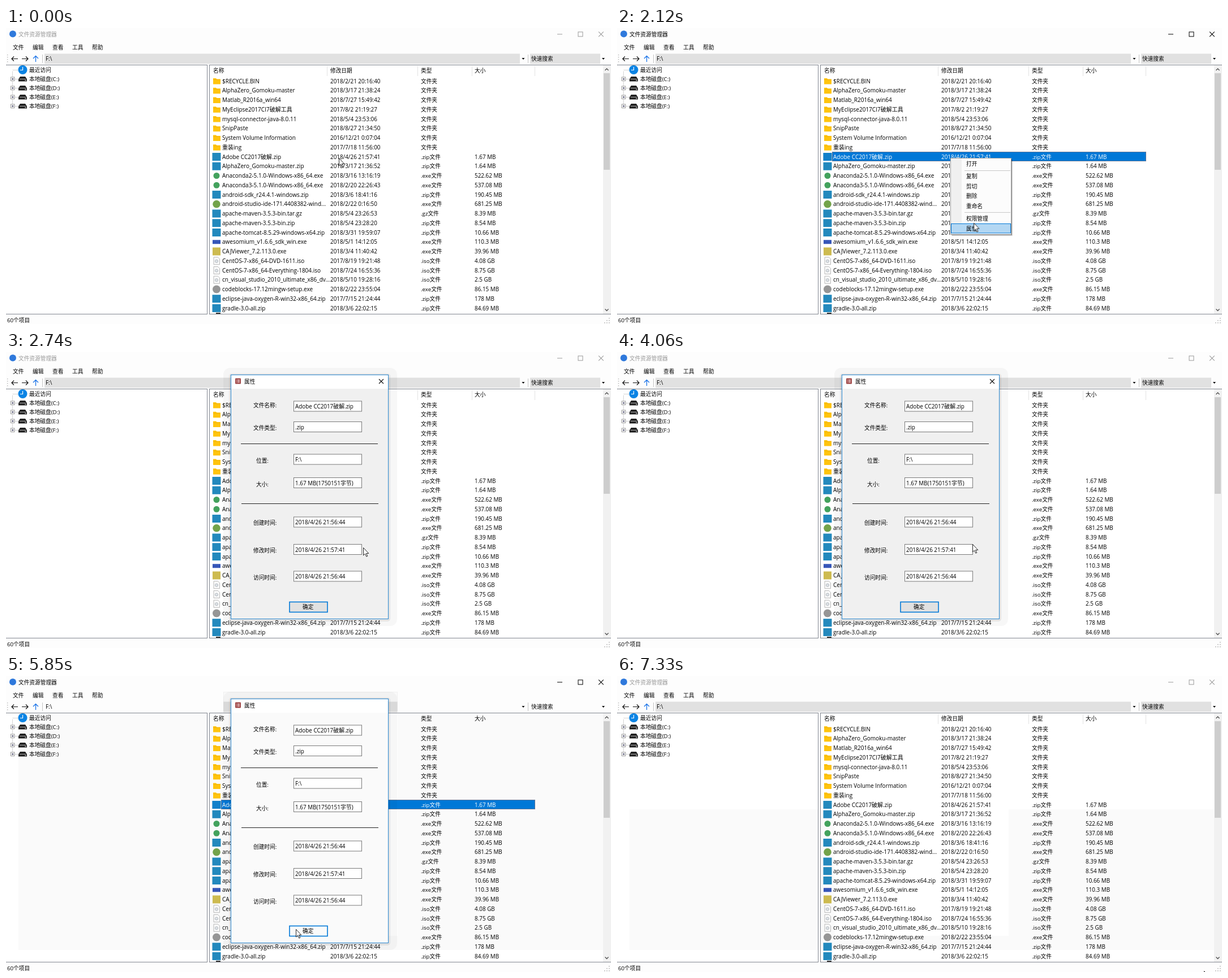
Animation, 1069 px wide and 524 px high, one loop 7.39 s. Source, as an HTML page:

```html
<!DOCTYPE html>
<html lang="zh-CN">
<head>
<meta charset="utf-8">
<title>文件资源管理器</title>
<style>
html, body { margin: 0; width: 100%; height: 100%; overflow: hidden; background: #fdfdfd; }
svg { display: block; width: 1069px; height: 524px; }
text { font: 9.9px "Open Sans", "Noto Sans CJK SC", sans-serif; white-space: pre; }
.han { font-size: 9.7px; }
.name { font-size: 10px; }
#dialog { transform-origin: 536.5px 256.5px; }
#ok { stroke: #0078d7; stroke-width: 1.6; }
</style>
</head>
<body>
<svg id="stage" viewBox="0 0 1069 524"></svg>
<script>
const LOOP = 7390;
const rect = (x, y, w, h, fill, more = '') =>
  `<rect x="${x}" y="${y}" width="${w}" height="${h}" fill="${fill}" ${more}/>`;
const path = (d, stroke, more = '') => `<path d="${d}" fill="none" stroke="${stroke}" ${more}/>`;
const dot = (x, y, r, fill) => `<circle cx="${x}" cy="${y}" r="${r}" fill="${fill}"/>`;
// y is the middle of the line
const text = (x, y, s, kind = '') => `<text x="${x}" y="${y + 3.6}" class="${kind}">${s}</text>`;
const han = (x, y, s) => text(x, y, s, 'han');
const group = (id, body) => `<g id="${id}">${body}</g>`;

const icons = {
  dir: y => `<path d="M366 ${y - 5}h5l1.5 1.5h6.5v9h-13z" fill="#ffc40d"/>` + path(`M366 ${y - 2.5}h13`, '#e9a800', 'stroke-width=".6"'),
  zip: y => rect(364.5, y - 7, 15, 14, '#2389bd'),
  ring: y => dot(372, y, 5.5, '#43a25d'),
  robot: y => dot(372, y, 6.8, '#73a34a'),
  blue: y => rect(365, y - 3.5, 14, 7, '#3656b8'),
  gold: y => rect(365, y - 7, 14, 14, '#cdbb50'),
  grey: y => dot(372, y, 7, '#969696'),
  iso: y => `<path d="M367 ${y - 6.5}h7.5l3 3v10h-10.5z" fill="#fafafa" stroke="#a8a8a8" stroke-width=".8"/>` +
    `<circle cx="372" cy="${y + .5}" r="2.6" fill="#e0e4e8" stroke="#9aa3aa" stroke-width=".7"/>`
};

const files = `dir|$RECYCLE.BIN|2018/2/21 20:16:40
dir|AlphaZero_Gomoku-master|2018/3/17 21:38:24
dir|Matlab_R2016a_win64|2018/7/27 15:49:42
dir|MyEclipse2017CI7破解工具|2017/8/2 21:19:27
dir|mysql-connector-java-8.0.11|2018/5/4 23:53:06
dir|SnipPaste|2018/8/27 21:34:50
dir|System Volume Information|2016/12/21 0:07:04
dir|重装ing|2017/7/18 11:56:00
zip|Adobe CC2017破解.zip|2018/4/26 21:57:41|.zip|1.67 MB
zip|AlphaZero_Gomoku-master.zip|2018/3/17 21:36:52|.zip|1.64 MB
ring|Anaconda2-5.1.0-Windows-x86_64.exe|2018/3/16 13:16:19|.exe|522.62 MB
ring|Anaconda3-5.1.0-Windows-x86_64.exe|2018/2/20 22:26:43|.exe|537.08 MB
zip|android-sdk_r24.4.1-windows.zip|2018/3/6 18:41:16|.zip|190.45 MB
robot|android-studio-ide-171.4408382-wind...|2018/2/22 0:16:50|.exe|681.25 MB
zip|apache-maven-3.5.3-bin.tar.gz|2018/5/4 23:26:53|.gz|8.39 MB
zip|apache-maven-3.5.3-bin.zip|2018/5/4 23:28:20|.zip|8.54 MB
zip|apache-tomcat-8.5.29-windows-x64.zip|2018/3/31 19:59:07|.zip|10.66 MB
blue|awesomium_v1.6.6_sdk_win.exe|2018/5/1 14:12:05|.exe|110.3 MB
gold|CAJViewer_7.2.113.0.exe|2018/3/4 11:40:42|.exe|39.96 MB
iso|CentOS-7-x86_64-DVD-1611.iso|2017/8/19 19:21:48|.iso|4.08 GB
iso|CentOS-7-x86_64-Everything-1804.iso|2018/7/24 16:55:36|.iso|8.75 GB
iso|cn_visual_studio_2010_ultimate_x86_dv...|2018/5/10 19:28:16|.iso|2.5 GB
grey|codeblocks-17.12mingw-setup.exe|2018/2/22 23:55:04|.exe|86.15 MB
zip|eclipse-java-oxygen-R-win32-x86_64.zip|2017/7/15 21:24:44|.zip|178 MB
zip|gradle-3.0-all.zip|2018/3/6 22:02:15|.zip|84.69 MB`.split('\n').map(l => l.split('|'));

const SELECTED = 8;
function row([icon, name, date, type, size], i) {
  const y = 94 + i * 16.75;
  const line = text(382, y, name, 'name') + text(573, y, date) +
    han(733, y, type ? type + '文件' : '文件夹') + (size ? text(828, y, size) : '');
  if (i !== SELECTED) return icons[icon](y) + line;
  const bar = rect(380.5, 219.5, 554, 16, '#0078d7', 'stroke="#63799a"') +
    rect(364.5, y - 7, 15, 14, '#0078d7', 'opacity=".5"');
  return icons[icon](y) + group('bar', bar) + group('picked', line);
}

function titleBar() {
  return dot(12, 10.5, 6, '#2f79dc') + group('caption',
    han(22, 11, '文件资源管理器') +
    '<path d="M974 10.5h9v1h-9zM1010.5 6.5h9v9h-9zm1 1v7h7v-7z" fill-rule="evenodd"/>' +
    '<path d="M1047.4 6.3l4 4 4-4 .7.7-4 4 4 4-.7.7-4-4-4 4-.7-.7 4-4-4-4z"/>');
}

function toolBar() {
  const menus = ['文件', '编辑', '查看', '工具', '帮助'].map((s, i) => han(12 + 35 * i, 34, s)).join('');
  const grip = [47, 51, 55, 59].map(y => rect(2, y, 1.3, 1.3, '#aaa')).join('');
  return menus + grip +
    group('fields', rect(68, 45.5, 840, 18, '#e1e1e1') + rect(926, 45.5, 124, 18, '#e1e1e1')) +
    group('trace', rect(384.5, 28.5, 307, 35, '#fafafa', 'stroke="#f0f0f0"') + rect(384, 45.5, 308, 18, '#e1e1e1')) +
    path('M21 54.5H10M14 50.5l-4 4 4 4M28 54.5h11M35 50.5l4 4-4 4', '#111', 'stroke-width="1.2"') +
    path('M52.5 60V49.5M48 54l4.5-4.5 4.5 4.5', '#1a73e8', 'stroke-width="1.3"') +
    path('M64.5 47v15M922.5 47v15', '#c4c4c4') +
    text(70, 54.5, 'F:\\') + han(928, 54.5, '快速搜索') +
    '<path d="M911.5 53h5l-2.5 3zM1053 53h5l-2.5 3z"/>';
}

function tree() {
  let s = path('M11.5 77v61M12 74.5h9', '#aaa', 'stroke-dasharray="1 1"') +
    dot(29.5, 74, 8, '#0c84e4') + path('M29.5 69v5.5h-4.5', '#fff', 'stroke-width="1.2"') + han(41, 74, '最近访问');
  ['C', 'D', 'E', 'F'].forEach((d, i) => {
    const y = 90 + 16 * i;
    s += path(`M16 ${y + .5}h5`, '#aaa', 'stroke-dasharray="1 1"') +
      rect(8.5, y - 3, 6.5, 6.5, '#fff', 'stroke="#999"') + path(`M10 ${y + .3}h3.6M11.8 ${y - 1.5}v3.6`, '#335', 'stroke-width=".9"') +
      `<path d="M25 ${y - 4}h9l3 4.5v4h-15v-4z" fill="#222"/>` +
      path(`M24 ${y + .4}h11`, '#ddd', 'stroke-width=".8"') + rect(33.5, y + 2, 2, 1.2, '#eee') +
      han(41, y, `本地磁盘(${d}:)`);
  });
  return s;
}

function panels() {
  return rect(-1, 65.5, 356.5, 441, '#fff', 'stroke="#828790"') +
    rect(359.5, 65.5, 720, 441, '#fff', 'stroke="#828790"') +
    group('tint', '<path d="M22 66H355V485H22zM360 66H384V485H360zM384 460H692V485H384zM692 66H1055V485H692z" fill="#fafafa"/>');
}

function list() {
  const head = [[366, '名称'], [573, '修改日期'], [733, '类型'], [828, '大小']].map(([x, s]) => han(x, 75.5, s)).join('');
  return head + path('M567.5 67v18', '#e2e2e2') +
    group('rules', path('M727.5 67v18M823.5 67v18M934.5 67v18', '#e2e2e2')) +
    files.map(row).join('') + rect(371, 504, 8, 2, '#333') +
    rect(1055, 66, 14, 440, '#f1f1f1') + rect(1056, 80, 11, 171, '#cdcdcd') +
    path('M1058.5 75l3-3 3 3M1058.5 497.5l3 3 3-3', '#505050', 'stroke-width="1.3"');
}

function status() {
  const dots = [[1066, 514], [1066, 518], [1062, 518], [1066, 522], [1062, 522], [1058, 522]];
  return han(2, 517, '60个项目') + dots.map(([x, y]) => rect(x - 1, y - 1, 1.6, 1.6, '#b5b5b5')).join('');
}

function contextMenu() {
  const items = [[240, '打开'], [262, '复制'], [280, '剪切'], [297.5, '删除'], [315, '重命名'], [337, '权限管理'], [355, '属性']];
  return rect(592, 233, 107, 135, '#000', 'opacity=".12"') + rect(591, 232, 107, 135, '#000', 'opacity=".35"') +
    rect(589.5, 230.5, 107, 135, '#fcfcfc', 'stroke="#a0a0a0"') + rect(590, 231, 19, 134, '#f0f0f0') +
    path('M614 252.5h81M614 326.5h81', '#c8c8c8') +
    group('mark', rect(590.5, .5, 105, 16.5, '#b3d7f3', 'stroke="#0078d7"')) +
    items.map(([y, s]) => han(617, y, s)).join('');
}

function dialog() {
  const rows = [
    [437, 94, '文件名称', 96, 'Adobe CC2017破解.zip'],
    [437, 134, '文件类型', 132.5, '.zip'],
    [442, 192, '位置', 190, 'F:\\'],
    [442, 234, '大小', 231.5, '1.67 MB(1750151字节)'],
    [437, 302, '创建时间', 301, '2018/4/26 21:56:44'],
    [437, 351, '修改时间', 349.5, '2018/4/26 21:57:41'],
    [437, 399, '访问时间', 397, '2018/4/26 21:56:44']
  ];
  return rect(384, 28, 307, 457, '#000', 'rx="12" opacity=".03"') + rect(394, 38, 285, 439, '#000', 'rx="5" opacity=".08"') +
    rect(397.5, 40.5, 278, 432, '#f0f0f0', 'id="face" stroke="#2b88d0"') +
    rect(398, 41, 277, 24, '#fff') +
    rect(405, 46.5, 10, 10, '#a14a4a', 'rx="1"') +
    path('M407 49.5h1M409 49.5h4M407 51.5h1M409 51.5h4M407 53.5h1M409 53.5h4', '#f3dede') +
    han(421, 52.5, '属性') + group('shut', path('M659 48l8 8M667 48l-8 8', '#111', 'stroke-width="1.1"')) +
    path('M415 162.5h242M416 268.5h242', '#222') +
    rows.map(([x, y, label, fy, value]) => han(x, y, label + ':') +
      rect(508.5, fy - 9, 120, 18, '#fff', 'stroke="#7a7a7a"') + text(511, fy + .5, value)).join('') +
    rect(501, 442.5, 67, 18, '#e1e1e1', 'id="ok"') + han(524, 451.5, '确定');
}

const arrow = '<path d="M.5.5V14l3-2.8 2.3 5 2-.9-2.2-4.8h4.2z" fill="#fff" stroke="#111" stroke-width=".9"/>';

document.getElementById('stage').innerHTML = titleBar() + toolBar() + panels() + tree() + list() + status() +
  group('menu', contextMenu()) + group('dialog', dialog()) + group('cursor', group('arrow', arrow));

// Keyframes keyed by milliseconds; hold = jump between values
const sheet = document.head.appendChild(document.createElement('style'));
function animate(id, prop, keys, hold = true) {
  const body = keys.map(([ms, v]) => `${(ms / LOOP * 100).toFixed(4)}%{${prop}:${v}}`).join('');
  sheet.textContent += `@keyframes k-${id}{${body}}
#${id}{animation:k-${id} ${LOOP}ms ${hold ? 'step-end' : 'linear'} infinite}
`;
}
const at = (x, y) => `translate(${x}px,${y}px)`;
const whenActive = (yes, no) => [[0, no], [500, yes], [2460, no], [5610, yes], [7330, no]];
const afterClose = (yes, no) => [[0, no], [5610, yes], [7330, no]];

animate('caption', 'fill', whenActive('#000', '#999'));
animate('bar', 'opacity', whenActive(1, 0));
animate('picked', 'fill', whenActive('#fff', '#000'));
animate('fields', 'opacity', afterClose(0, 1));
animate('trace', 'opacity', afterClose(1, 0));
animate('rules', 'opacity', afterClose(0, 1));
animate('tint', 'clip-path', [[0, 'polygon(0 0,0 0,0 0)'],
  [5610, 'polygon(0 0,1069px 0,1069px 524px,0 524px)'],
  [7330, 'polygon(0 170px,1069px 170px,1069px 524px,0 524px)']]);
animate('menu', 'opacity', [[0, 0], [500, .25], [550, .5], [600, .75], [650, 1], [2460, 0]]);
animate('mark', 'transform', [[0, at(0, -900)], [1165, at(0, 231)], [1255, at(0, 253.5)], [1329, at(0, 271)],
  [1440, at(0, 288.5)], [1590, at(0, 306)], [1783, at(0, 328)], [2090, at(0, 346)]]);
animate('face', 'fill', afterClose('#fafafa', '#f0f0f0'));
animate('shut', 'opacity', afterClose(0, 1));
animate('ok', 'fill', [[0, '#e1e1e1'], [4850, '#e5f1fb'], [5610, '#fafafa']]);

const pose = (opacity, scale) => `${opacity};transform:scale(${scale})`;
animate('dialog', 'opacity', [[0, pose(0, .94)], [2530, pose(0, .94)], [2590, pose(.5, .971)], [2640, pose(.8, .99)],
  [2740, pose(1, 1)], [5870, pose(1, 1)], [6000, pose(0, .94)], [LOOP, pose(0, .94)]], false);

animate('cursor', 'transform', [[0, at(588, 230)], [1160, at(588, 230)], [1370, at(610, 281)], [1880, at(627, 339)],
  [1910, at(627, 340)], [2180, at(631, 346)], [2950, at(631, 346)], [3190, at(628, 341)], [3800, at(628, 341)],
  [3810, at(628, 340)], [4060, at(628, 340)], [4090, at(628, 339)], [4270, at(628, 339)], [4960, at(512, 456)],
  [5050, at(512, 456)], [5110, at(512, 448)], [5900, at(512, 448)], [6250, at(700, 491)], [6261, at(1037, 524)],
  [6980, at(1037, 524)], [7150, at(1037, 522)], [LOOP, at(1037, 522)]], false);
animate('arrow', 'opacity', [[0, 1], [6250, 0], [6980, 1]]);
</script>
</body>
</html>
```
